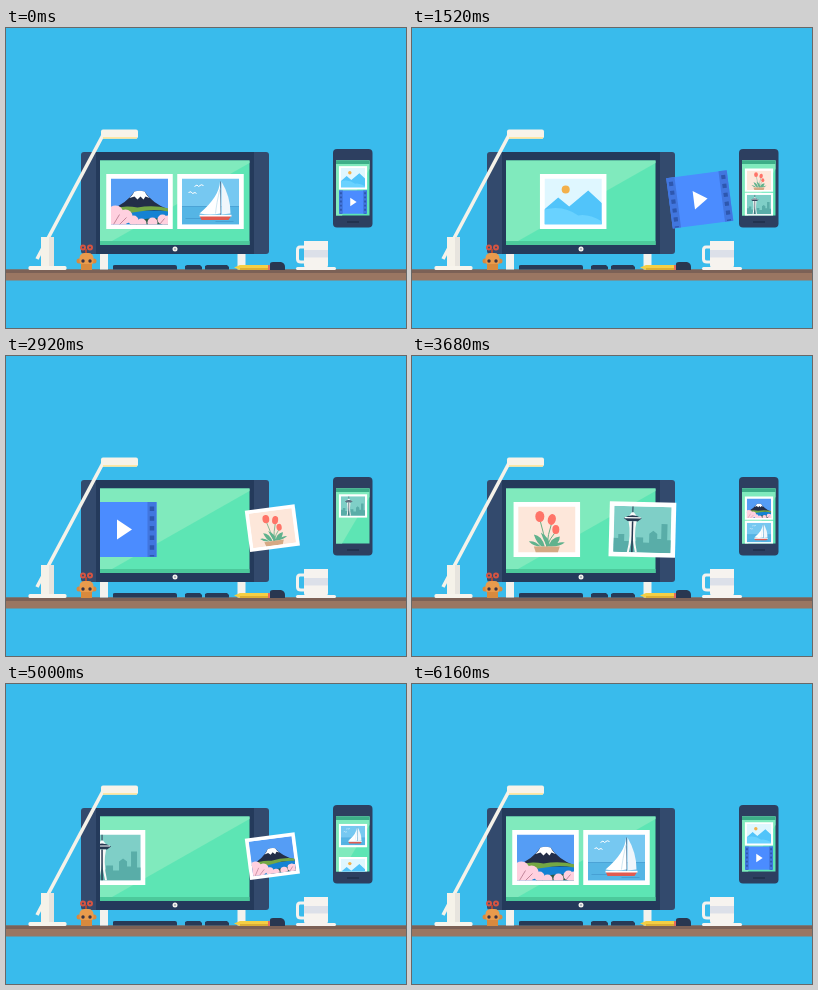
An HTML page that plays this animation: 400x300 px, repeating every 6200 ms.

```html
<!DOCTYPE html>
<html lang="en">
<head>
<meta charset="utf-8">
<title>Desk photo transfer</title>
<style>
  html, body { margin: 0; width: 100%; height: 100%; overflow: hidden; background: #39bbec; }
  svg { display: block; }
  body > svg { width: 100vw; height: 100vh; }
</style>
</head>
<body>
<svg viewBox="0 0 400 300" xmlns="http://www.w3.org/2000/svg">
  <defs>
    <clipPath id="monitorClip"><path d="M94 132.5H243.500V217H94z"/></clipPath>
    <clipPath id="phoneClip"><path d="M330 132.500H364V187.500H330z"/></clipPath>
    <path id="frame" d="M-33.250-27.500H33.250V27.500H-33.250z" fill="#fff"/>

    <g id="volcano">
      <use href="#frame"/>
      <svg x="-28.500" y="-23" width="57" height="46" viewBox="-28.500 -23 57 46">
        <path d="M-29-23H29V23H-29z" fill="#559df5"/>
        <path d="M-29 8Q-13 2-5-10Q0-11.500 5-10Q13 2 29 8V11H-29z" fill="#232e48"/>
        <path d="M-10-3.500Q-7-6-5-10Q0-11.500 5-10Q7-6 10-3.500L6-5L4-2L1-5L-2-2L-5-5z" fill="#fff"/>
        <path d="M-29 9H29V23H-29z" fill="#1582d3"/>
        <path d="M-29 8Q-16 3-2 6Q14 3 29 7V10Q14 7 0 10L-14 12H-29z" fill="#74a744"/>
        <path d="M-10 23Q4 14 29 18V23z" fill="#2c5a46"/>
        <g fill="#ffd0df">
          <circle cx="-24" cy="12" r="8"/><circle cx="-14" cy="15" r="7"/>
          <circle cx="-22" cy="21" r="9"/><circle cx="-6" cy="19" r="5"/>
          <circle cx="2" cy="22" r="5"/><circle cx="13" cy="21" r="5"/>
          <circle cx="23" cy="18" r="5"/><circle cx="28" cy="20" r="6"/>
        </g>
        <path d="M-26 23L-20 13M-20 23L-13 16M20 23L25 17" stroke="#a9677d" stroke-width=".7"/>
      </svg>
    </g>

    <g id="boat">
      <use href="#frame"/>
      <svg x="-28.500" y="-23" width="57" height="46" viewBox="-28.500 -23 57 46">
        <path d="M-29-23H29V23H-29z" fill="#76c8f1"/>
        <path d="M-29 5H29V23H-29z" fill="#55b5e5"/>
        <path d="M-29 5H29M-25 17H-8M5 20H23" stroke="#4199cd" stroke-width=".7"/>
        <path d="M-16-15Q-13-18-12-15Q-9-18-7-16M-22-9Q-19-11-18-8Q-15-10-14-8" fill="none" stroke="#fff"/>
        <path d="M10-20V14" stroke="#506d8c" stroke-width=".8"/>
        <path d="M9.500-20Q9-5-11 12Q0 14 10 12z" fill="#fff"/>
        <path d="M11-20Q20-5 20 12L11 13z" fill="#f0f6fb"/>
        <path d="M9.500-13Q6 2 5 12" fill="none" stroke="#bcdceb" stroke-width=".7"/>
        <path d="M-11 14H21L18 18.500H-9z" fill="#e05b50"/>
        <path d="M-11 13.200H21V15H-11z" fill="#fff"/>
      </svg>
    </g>

    <g id="landscape">
      <use href="#frame"/>
      <svg x="-28.500" y="-23" width="57" height="46" viewBox="-28.500 -23 57 46">
        <path d="M-29-23H29V23H-29z" fill="#dff7ff"/>
        <circle cx="-7.500" cy="-12" r="4" fill="#f3b04a"/>
        <path d="M-29 8L-15-4L-4 5L15-11L29 2V23H-29z" fill="#51c4fa"/>
        <path d="M-29 8Q-10 3 5 14Q15 12 29 20V23H-29z" fill="#69d2ff"/>
      </svg>
    </g>

    <g id="video">
      <path d="M-33-27.500H33V27.500H-33z" fill="#4b8cff"/>
      <path id="film" d="M24-27.500H33V27.500H24z" fill="#4176df"/>
      <use href="#film" x="-57"/>
      <path d="M28.500-23V27M-28.500-23V27" stroke="#2d57af" stroke-width="4.500" stroke-dasharray="4.500 5.200"/>
      <path d="M-6.500-10L8.500 0L-6.500 10z" fill="#fff"/>
    </g>

    <g id="tulips">
      <use href="#frame"/>
      <svg x="-28.500" y="-23" width="57" height="46" viewBox="-28.500 -23 57 46">
        <path d="M-29-23H29V23H-29z" fill="#fde7da"/>
        <path d="M-7-10Q-3 5 0 17M5-7Q1 5 0 17M9 2Q3 9 0 17" fill="none" stroke="#6aae83"/>
        <path d="M-2 17Q-5 6-13 5Q-10 14-5 17zM0 17Q-4 9-6 3Q3 8 3 17zM2 17Q4 8 13 7Q13 14 5 17zM-6 17Q-12 11-18 12Q-13 17-6 17zM5 17Q11 12 18 13Q13 17 5 17z" fill="#60b28d"/>
        <g fill="#ff7468">
          <ellipse cx="-7" cy="-13" rx="4.500" ry="5.500"/>
          <ellipse cx="5" cy="-10" rx="4" ry="5.500" transform="rotate(15 5 -10)"/>
          <ellipse cx="9" cy="0" rx="3.500" ry="4.500"/>
        </g>
        <path d="M-13 17H13L11 23H-11z" fill="#d5a984"/>
      </svg>
    </g>

    <g id="tower">
      <use href="#frame"/>
      <svg x="-28.500" y="-23" width="57" height="46" viewBox="-28.500 -23 57 46">
        <path d="M-29-23H29V23H-29z" fill="#7fcfc7"/>
        <path d="M-29 9H-24V5H-18V12H-6V8H1V13H7V4L11 1L15 4V9H19V-6H25V10H29V23H-29z" fill="#59ada8"/>
        <path d="M-10-23V-15" stroke="#263850"/>
        <path d="M-11-17H-9L-6-13H-14z" fill="#f8fbfb"/>
        <path d="M-19-11Q-10-17-1-11L-5-8H-15z" fill="#263850"/>
        <path d="M-18-11.500H-2" stroke="#fff" stroke-width="1.200"/>
        <path d="M-14-8H-6Q-9 6-5 23H-7Q-9 14-10 5Q-11 14-13 23H-15Q-11 6-14-8z" fill="#f7f8f6"/>
        <path d="M-10-8V23" stroke="#263850" stroke-width="1.500"/>
      </svg>
    </g>
  </defs>

  <path d="M0 0H400V300H0z" fill="#39bbec"/>

  <g id="shelf">
    <path d="M0 241.500H400V252.500H0z" fill="#9a7662"/>
    <path d="M0 241.500H400V245H0z" fill="#7c6156"/>
  </g>

  <g id="monitor">
    <path d="M94 225H102V241.500H94zM231.500 225H239.500V241.500H231.500z" fill="#f3f2ed"/>
    <rect x="75" y="124" width="188" height="102" rx="3" fill="#334a6d"/>
    <path d="M90 124H248V226H90z" fill="#243a5b"/>
    <path d="M94 132.500H243.500V217H94z" fill="#5de5b4"/>
    <path d="M94 132.500H243.500V135L106 213H94z" fill="#80eabd"/>
    <path d="M94 213H243.500V217H94z" fill="#4cc99b"/>
    <circle cx="169" cy="221" r="2.500" fill="#f3f2ed"/>
    <circle cx="169" cy="221" r=".8" fill="#617087"/>
  </g>
  <g id="monitorLayer" clip-path="url(#monitorClip)"></g>

  <g id="lamp">
    <path d="M97 107L31 231" stroke="#f5f2e9" stroke-width="3.600"/>
    <rect x="95" y="101.500" width="37" height="9" rx="2" fill="#f8f3e9"/>
    <path d="M97 109H131V110.800H97z" fill="#ffe7a2"/>
    <path d="M35 209H48V239H35z" fill="#f5f2e9"/>
    <path d="M43 209H48V239H43z" fill="#e7e4de"/>
    <rect x="22.500" y="238" width="38" height="4" rx="1.500" fill="#f7f4ec"/>
  </g>

  <g id="toy">
    <path d="M80 221V227" stroke="#a94836" stroke-width="2"/>
    <circle cx="77" cy="219.500" r="2" fill="none" stroke="#d65442" stroke-width="2"/>
    <circle cx="84" cy="219.500" r="2" fill="none" stroke="#d65442" stroke-width="2"/>
    <circle cx="73" cy="233" r="2.500" fill="#d88a3e"/>
    <circle cx="88" cy="233" r="2.500" fill="#d88a3e"/>
    <rect x="73.500" y="225" width="14" height="13" rx="5" fill="#e99b4c"/>
    <path d="M75 236H86V242H75z" fill="#d88a3e"/>
    <circle cx="77" cy="233" r="1.700" fill="#3b3443"/>
    <circle cx="84" cy="233" r="1.700" fill="#3b3443"/>
  </g>

  <g id="deskItems">
    <path d="M107 241.500V238Q107 237 109 237H169Q171 237 171 239V241.500zM179 241.500V238L181 237H194L196 239V241.500zM199 241.500V238L201 237H221L223 239V241.500z" fill="#273a57"/>
    <path d="M228 239.500L234 237H262V242H234z" fill="#f4cf45"/>
    <path d="M234 240H262V242H234z" fill="#dcae35"/>
    <path d="M262 237H266V242H262z" fill="#e56b60"/>
    <path d="M264 242V236Q264 234 267 234H275Q279 235 279 239V242z" fill="#293750"/>
    <path d="M299 219H294Q291.500 219 291.500 222V231Q291.500 234 295 234H299" fill="none" stroke="#f5f2ee" stroke-width="3"/>
    <path d="M298 213H322V237Q322 240 319 240H301Q298 240 298 237z" fill="#f6f3ef"/>
    <path d="M298 222H322V229.500H298z" fill="#dce0e9"/>
    <rect x="290" y="239" width="40" height="3" rx="1.500" fill="#f6f3ef"/>
  </g>

  <g id="phone">
    <rect x="327" y="121" width="39.500" height="78.500" rx="4" fill="#2d3f60"/>
    <path d="M330 132.500H363.500V187.500H330z" fill="#5de5b4"/>
    <path d="M330 132.500H363.500V141L336 187.500H330z" fill="#80eabd"/>
    <path d="M330 132.500H363.500V136H330z" fill="#3dae88"/>
    <path d="M341 194H353" stroke="#22324f" stroke-width="2"/>
  </g>
  <g id="phoneLayer" clip-path="url(#phoneClip)"></g>
  <g id="flightLayer"></g>
</svg>

<script>
const LOOP = 6200;
const THUMB = 0.424;
const LEFT = 133.5, CENTER = 168.500, RIGHT = 204.5, ROW = 173.500;
const PHONE_X = 347, SLOT = 149.800, GAP = 24.300;
const PICTURES = ['volcano', 'boat', 'landscape', 'video', 'tulips', 'tower'];

// Start times in ms; "clear" also holds a duration.
const ROUNDS = [
  { clear: [880, 600], fly: [524, 1162], up: 620, enter: 660, next: 1160, push: 1380 },
  { clear: [2480, 800], fly: [2550, 3128], up: 2560, enter: 2800, next: 3320, push: 3300 },
  { clear: [4520, 800], fly: [4630, 5160], up: 4728, enter: 4740, next: 5300, push: 5420 }
];
const TILT = [[0, 0], [200, -7], [400, -7.5], [560, 1.5], [720, 0.8], [1000, 0]];

const clamp = v => Math.min(1, Math.max(0, v));
const lerp = (a, b, p) => a + (b - a) * p;
const sine = v => (1 - Math.cos(Math.PI * clamp(v))) / 2;

// Cubic bezier (0.5, 0, 0.2, 1), solved by bisection.
function glide(v) {
  v = clamp(v);
  let low = 0, high = 1;
  for (let i = 0; i < 24; i++) {
    const s = (low + high) / 2, r = 1 - s;
    if (1.5 * r * r * s + 0.6 * r * s * s + s ** 3 < v) low = s; else high = s;
  }
  return low * low * (3 - 2 * low);
}

function tiltAt(u) {
  const i = TILT.findIndex(key => u < key[0]);
  if (i < 1) return 0;
  const [t0, a] = TILT[i - 1], [t1, b] = TILT[i];
  return lerp(a, b, sine((u - t0) / (t1 - t0)));
}

function addPicture(layer) {
  const use = document.createElementNS('http://www.w3.org/2000/svg', 'use');
  return document.getElementById(layer).appendChild(use);
}
const pair = layer => [addPicture(layer), addPicture(layer)];
const shown = pair('monitorLayer');
const queued = pair('phoneLayer');
const flying = pair('flightLayer');

function place(use, picture, x, y, scale = 1, tilt = 0) {
  use.setAttribute('href', '#' + PICTURES[picture % PICTURES.length]);
  use.setAttribute('transform', `translate(${x} ${y}) rotate(${tilt}) scale(${scale})`);
}

function render(t) {
  const index = t < 2400 ? 0 : t < 4440 ? 1 : 2;
  const round = ROUNDS[index], first = index * 2;

  const away = -150 * sine((t - round.clear[0]) / round.clear[1]);
  const queueY = SLOT + GAP + 48 * (1 - glide((t - round.enter) / 500))
    - GAP * glide((t - round.next) / 560);

  for (let i = 0; i < 2; i++) {
    place(shown[i], first + i, (i ? RIGHT : LEFT) + away, ROW);
    place(queued[i], first + 4 + i, PHONE_X, queueY + i * GAP, THUMB);

    const u = t - round.fly[i];
    const lift = u > 0 && u < 300 ? 5 * Math.sin(Math.PI * u / 300) : 0;
    const slotY = i ? SLOT + GAP * (1 - glide((t - round.up) / 400)) : SLOT;
    let x = lerp(PHONE_X, i ? RIGHT : CENTER, glide(u / 1000));
    if (!i) x += (LEFT - CENTER) * glide((t - round.push) / 500);
    const y = lerp(slotY, ROW, sine((u - 100) / 320)) - lift;
    const scale = lerp(THUMB, 1, sine((u - 130) / (i ? 300 : 440)));
    place(flying[i], first + 2 + i, x, y, scale, tiltAt(u));
  }
}

const start = performance.now();
function tick() {
  render((performance.now() - start) % LOOP);
  requestAnimationFrame(tick);
}
tick();
</script>
</body>
</html>
```
